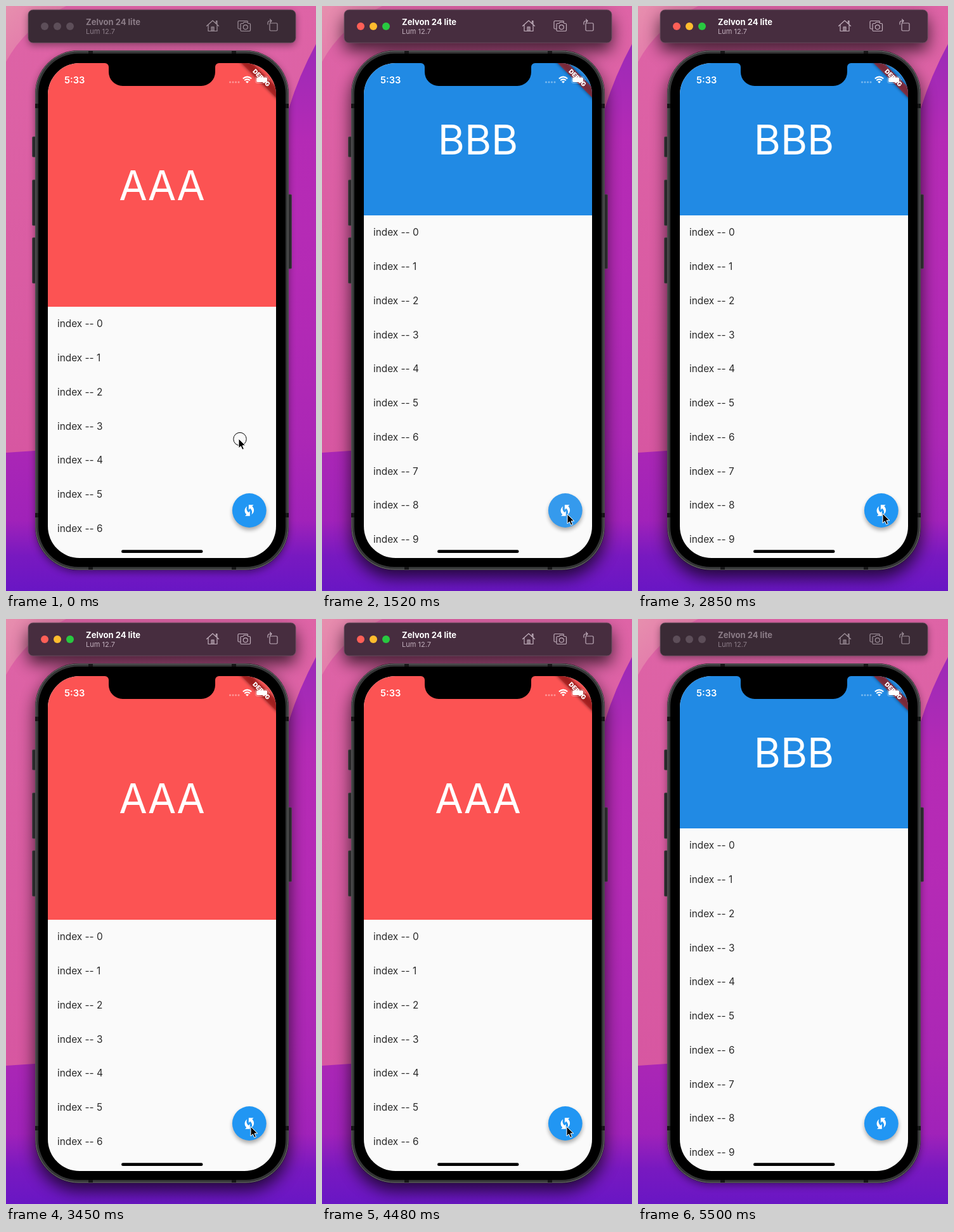
An HTML page that plays this animation: 489x922 px, repeating every 5.6 s.

```html
<!DOCTYPE html>
<html lang="en">
<head>
<meta charset="utf-8">
<title>Header switch</title>
<style>
  html, body { margin: 0; width: 100%; height: 100%; overflow: hidden; background: #b42ab4; }
  svg { display: block; width: 489px; height: 922px; font-family: Inter, "Open Sans", sans-serif; }
  .line { fill: none; stroke-width: 1.2; stroke-linejoin: round; stroke-linecap: round; }
</style>
</head>
<body>
<svg viewBox="0 0 489 922">
  <defs>
    <linearGradient id="base" x2="0" y2="1">
      <stop offset="0" stop-color="#c643b0"/>
      <stop offset=".3" stop-color="#b92cb5"/>
      <stop offset=".75" stop-color="#ab27b5"/>
      <stop offset=".88" stop-color="#a022b9"/>
      <stop offset=".94" stop-color="#7819c0"/>
      <stop offset="1" stop-color="#6916c4"/>
    </linearGradient>
    <linearGradient id="pink" x2="0" y2="1">
      <stop offset="0" stop-color="#de64a6"/>
      <stop offset="1" stop-color="#d757a1"/>
    </linearGradient>
    <linearGradient id="pale" x2="1" y2="1">
      <stop offset="0" stop-color="#e78fae"/>
      <stop offset="1" stop-color="#df6ca8"/>
    </linearGradient>
    <linearGradient id="right" x2="0" y2="1">
      <stop offset="0" stop-color="#9c2ab7"/>
      <stop offset=".3" stop-color="#b42ab5"/>
      <stop offset="1" stop-color="#b42ab5" stop-opacity="0"/>
    </linearGradient>
    <filter id="wide" x="-30%" y="-30%" width="160%" height="160%"><feGaussianBlur stdDeviation="13"/></filter>
    <filter id="soft" x="-30%" y="-30%" width="160%" height="160%"><feGaussianBlur stdDeviation="6"/></filter>
    <filter id="fabBlur" x="-40%" y="-200%" width="180%" height="500%"><feGaussianBlur stdDeviation="3"/></filter>
    <clipPath id="screen"><rect x="66" y="90" width="360" height="780" rx="50"/></clipPath>
    <g id="silhouette">
      <rect x="35" y="6" width="422" height="52" rx="8"/>
      <rect x="46" y="70" width="400" height="819" rx="68"/>
    </g>
  </defs>

  <!-- wallpaper -->
  <rect width="489" height="922" fill="url(#base)"/>
  <path d="M0 0H489V60Q462 110 446 162L300 420L60 700L0 704Z" fill="url(#pink)"/>
  <path d="M0 0H95Q30 32 0 88Z" fill="url(#pale)"/>
  <path d="M489 60Q462 110 446 162V560H489Z" fill="url(#right)"/>

  <use id="activeShadow" href="#silhouette" y="12" filter="url(#wide)" opacity=".7"/>
  <use id="idleShadow" href="#silhouette" y="4" filter="url(#soft)" opacity=".4"/>

  <!-- title bar -->
  <rect id="bar" x="35" y="6" width="422" height="52" rx="7.5" stroke="#6b5462" stroke-width=".8"/>
  <g id="lights">
    <circle cx="61" cy="32" r="6"/><circle cx="81" cy="32" r="6"/><circle cx="101" cy="32" r="6"/>
  </g>
  <text id="device" x="126" y="30" font-size="13" font-weight="700">Zelvon 24 lite</text>
  <text id="system" x="126" y="44" font-size="11">Lum 12.7</text>
  <g id="tools" class="line">
    <path d="M316.500 31.500L326 23L335.500 31.500M319 30V39.500H333V30M331.500 27V23.500H333V28M324 39V33H328V39M326 33V39"/>
    <path d="M369.500 36H367.500Q366 36 366 34.500V25Q366 23.500 367.500 23.500H380Q381.500 23.500 381.500 25"/>
    <path d="M371.500 27.500H374L375.500 25.500H380.500L382 27.500H384Q385.500 27.500 385.500 29V37.500Q385.500 39.500 384 39.500H371.500Q370 39.500 370 38V29Q370 27.500 371.500 27.500Z"/>
    <circle cx="377.800" cy="33.300" r="3.500"/>
    <rect x="416" y="27" width="12" height="12" rx="1.500"/>
    <path d="M413 29V27Q413 23.500 416.500 23.500H419M416.500 21L419 23.500L416.500 26"/>
  </g>

  <!-- phone body -->
  <g fill="#29292b" stroke="#4d484d" stroke-width=".7">
    <rect x="41.500" y="206" width="6" height="32" rx="1.500"/>
    <rect x="41.500" y="274" width="6" height="72" rx="1.500"/>
    <rect x="41.500" y="365" width="6" height="72" rx="1.500"/>
    <rect x="444.500" y="297" width="6" height="117" rx="1.500"/>
  </g>
  <rect x="46" y="70" width="400" height="819" rx="68" fill="#1a1a1b"/>
  <rect x="47" y="71" width="398" height="817" rx="67" fill="#343536" stroke="#737375" stroke-width="1"/>
  <path d="M130 71h7v5h-7zM356 71h7v5h-7zM130 884h7v4h-7zM356 884h7v4h-7zM46 154h5v7h-5zM441 154h5v7h-5zM46 799h5v7h-5zM441 799h5v7h-5z" fill="#161617"/>
  <rect x="51" y="75" width="390" height="809" rx="63" fill="#000"/>

  <!-- app -->
  <g clip-path="url(#screen)">
    <rect x="66" y="90" width="360" height="780" fill="#fafafa"/>
    <rect id="header" x="66" y="90" width="360"/>
    <text id="heading" x="246" font-size="64.500" fill="#fff" text-anchor="middle"></text>
    <g id="list" font-size="15.360" fill="#2a2a2a"></g>

    <circle cx="384" cy="799" r="27" opacity=".32" filter="url(#fabBlur)"/>
    <circle id="fab" cx="383.800" cy="795" r="26.900"/>
    <path transform="translate(372.280 783.480) scale(.96)" fill="#fff" d="M16.710 5.290L19 3h-8v8l2.300-2.300c1.970 1.460 3.250 3.780 3.250 6.420 0 1.310-.32 2.540-.88 3.630 2.330-1.520 3.880-4.140 3.880-7.130 0-2.520-1.110-4.770-2.840-6.330zM7.460 8.880c0-1.310.32-2.540.88-3.630C6 6.770 4.460 9.390 4.460 12.380c0 2.520 1.100 4.770 2.840 6.330L5 21h8v-8l-2.300 2.300C8.740 13.840 7.460 11.520 7.460 8.880z"/>

    <g transform="translate(426 90) rotate(45) scale(.96)">
      <rect x="-48" y="28" width="96" height="12" opacity=".55" filter="url(#fabBlur)"/>
      <rect x="-48" y="28" width="96" height="12" fill="#b71c1c" fill-opacity=".63"/>
      <text y="37.700" font-size="10.200" font-weight="900" fill="#fff" text-anchor="middle">DEBUG</text>
    </g>
    <path d="M156 90A6 6 0 0 1 162 96V104A22 22 0 0 0 184 126H308A22 22 0 0 0 330 104V96A6 6 0 0 1 336 90Z"/>
  </g>

  <!-- status bar -->
  <g fill="#fff">
    <text x="92" y="121.700" font-size="14.700" font-weight="600">5:33</text>
    <g opacity=".4">
      <circle cx="353.500" cy="120" r="1.500"/><circle cx="358" cy="120" r="1.500"/>
      <circle cx="362.500" cy="120" r="1.500"/><circle cx="367" cy="120" r="1.500"/>
    </g>
    <path d="M373.800 114.500Q380.500 108.800 387.200 114.500M376.200 117.200Q380.500 113.600 384.800 117.200" fill="none" stroke="#fff" stroke-width="2"/>
    <path d="M378 119.200Q380.500 117.200 383 119.200L380.500 121.800Z"/>
    <rect x="393.500" y="111" width="20" height="10.500" rx="3" fill="none" stroke="#fff" stroke-opacity=".4"/>
    <rect x="395" y="112.500" width="17" height="7.500" rx="1.800"/>
    <path d="M415 114.500q2 1.700 0 3.500z" opacity=".5"/>
  </g>
  <rect x="182" y="857.300" width="128.500" height="4.800" rx="2.400"/>

  <!-- pointer, tip at the local zero point -->
  <g id="pointer">
    <g id="ring" fill="none">
      <circle cx="2" cy=".5" r="9.200" stroke="#fff"/>
      <circle cx="2" cy=".5" r="10.200" stroke="#000"/>
    </g>
    <path d="M0 0V15L3.400 11.800L5.800 17.300L8.400 16.200L6 10.800H10.800Z" stroke="#fff" stroke-width="1"/>
  </g>
</svg>
<script>
const LOOP = 5600;
const SCALE = 0.96;
const ROW = 56 * SCALE;
const TOP = 90;
const pages = [
  { label: "AAA", color: "#fc5353", bottom: 474 },
  { label: "BBB", color: "#218ae4", bottom: 330 },
];
const switches = [1520, 2110, 2710, 3300, 3750, 4330, 4630];
const ripples = [[1520, 1670], [1960, 2260], [2710, 2850], [3150, 3450], [3750, 3890], [4190, 4480], [4630, 4910]];
const presses = [[0, 150], [1960, 2110], [3150, 3300], [4190, 4330]];
const focus = [[150, 5360]];
const approach = [150, 300, 460, 620, 770, 920];
const moves = [[1520, 387, 801], [1960, 386, 800], [4770, 413, 836], [4910, 435, 871], [5060, 453, 908], [5210, 460, 940]];
const lightColors = ["#fe5f57", "#febc2e", "#28c840"];

const $ = id => document.getElementById(id);
const set = (el, attrs) => { for (const name in attrs) el.setAttribute(name, attrs[name]); };
const within = (spans, t) => spans.some(([from, to]) => t >= from && t < to);

for (let i = 0; i < 10; i++) {
  const row = document.createElementNS("http://www.w3.org/2000/svg", "text");
  set(row, { x: 81, y: ROW * (i + 0.5) + 5.5 });
  row.textContent = `index -- ${i}`;
  $("list").append(row);
}

function pointerAt(t) {
  const move = moves.findLast(([start]) => t >= start);
  if (move) return move.slice(1);
  const p = approach.filter(start => t >= start).length / approach.length;
  const eased = p * p * (3 - 2 * p);
  return [367 + 19 * eased, 682 + 118 * eased];
}

function drawWindow(active) {
  set($("bar"), { fill: active ? "#472d3f" : "#3a2a35" });
  set($("device"), { fill: active ? "#fff" : "#8b7c87" });
  set($("system"), { fill: active ? "#c0aebb" : "#8b7c87" });
  set($("tools"), { stroke: active ? "#c0aebb" : "#a0929c" });
  set($("activeShadow"), { visibility: active ? "visible" : "hidden" });
  set($("idleShadow"), { visibility: active ? "hidden" : "visible" });
  [...$("lights").children].forEach((light, i) => set(light, { fill: active ? lightColors[i] : "#5d4e59" }));
}

function draw(t) {
  const page = pages[switches.filter(start => t >= start).length % 2];
  set($("header"), { height: page.bottom - TOP, fill: page.color });
  set($("heading"), { y: (TOP + page.bottom) / 2 + 24.2 });
  $("heading").textContent = page.label;
  set($("list"), { transform: `translate(0 ${page.bottom})` });
  set($("fab"), { fill: within(ripples, t) ? "#359aed" : "#2196f3" });
  set($("ring"), { visibility: within(presses, t) ? "visible" : "hidden" });
  set($("pointer"), { transform: `translate(${pointerAt(t)})` });
  drawWindow(within(focus, t));
}

function tick() {
  draw(performance.now() % LOOP);
  requestAnimationFrame(tick);
}
tick();
</script>
</body>
</html>
```
